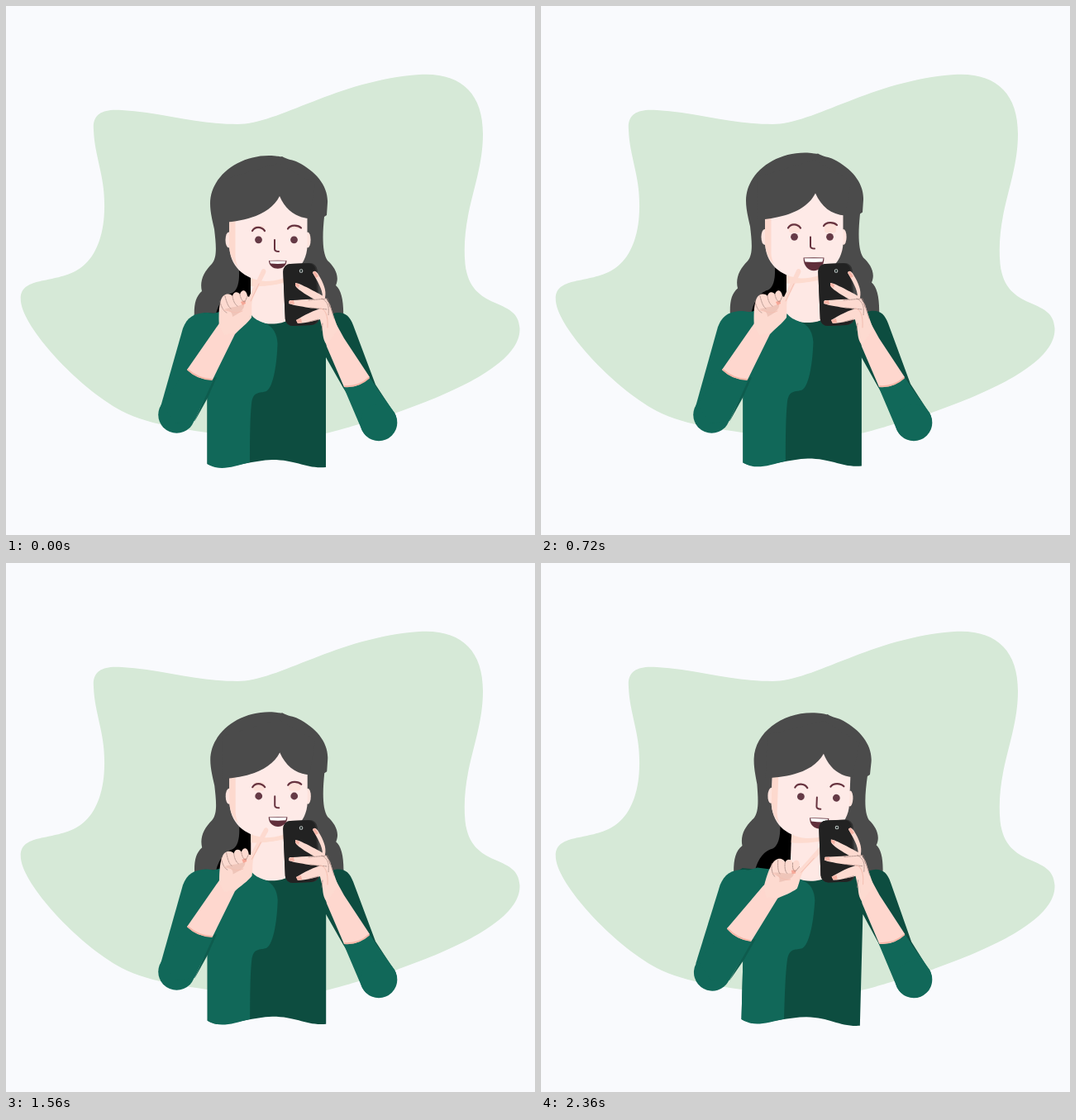
An HTML page for the animation above (2.4 s loop, 640 by 640 pixels).

```html
<!DOCTYPE html>
<html lang="en">
<head>
<meta charset="utf-8">
<title>Selfie</title>
<style>
html, body { margin: 0; width: 100%; height: 100%; overflow: hidden; background: #f9fafd; }
svg { display: block; width: 100%; height: 100%; }
.line { fill: none; stroke-linecap: round; stroke-linejoin: round; }
</style>
</head>
<body>
<svg viewBox="0 0 640 640">
  <path fill="#d6e9d7" d="M106 150C104 130 118 124 140 126C190 129 230 143 280 143C330 143 400 90 500 83C550 80 577 105 577 155C577 210 550 250 555.500 312C562 372 620 350 621.500 390C623 430 550 465 470 493C430 505 405 513 387 517C340 522 290 522 243 516C200 510 165 503 140 490C85 460 22 390 18 358C14 325 60 338 90 317C109 304 120 275 119 238C119 205 107 180 106 150Z"/>

  <g id="head">
    <path fill="#4b4b4b" d="M228 380C227 362 229 352 237 345C234 333 239 322 249 312C256 304 254 288 252 270C249 257 247 248 247 239C247 207 280 181 318 181C330 181 331 183 334 182C340 186 348 186 353 189C375 200 390 218 389 238L388 253L385 255C383 275 382 298 389 308C398 316 404 327 399 338C406 344 409 358 408 380Z"/>
    <path fill="#000" d="M281 308L297 326V378H253C256 358 266 349 274 347C283 342 283 325 281 308Z"/>
    <path fill="#fee8e4" d="M296 322H346V392H296Z"/>
    <path fill="#fddbcf" d="M296 326H346V332C330 337 312 340 296 339Z"/>
    <ellipse cx="269.500" cy="283" rx="4" ry="9.500" fill="#fee3dd"/>
    <ellipse cx="365" cy="283" rx="3.600" ry="9.500" fill="#fee3dd"/>
    <path fill="#feeae7" d="M270 228H364.500V290C364 316 342 333 314 333C288 331 270 315 270 288Z"/>
    <path fill="#fdd9ce" d="M270 240H277.500V300C277 306 279 312 281 316C274 309 270 300 270 288Z"/>
    <path fill="#4b4b4b" d="M262 262C295 260 321 250 331 230C338 246 350 256 367 257L374 215L330 190L262 210Z"/>
    <g fill="#653a46">
      <circle cx="305.500" cy="282.800" r="4.400"/>
      <circle cx="348.500" cy="282.800" r="4.400"/>
    </g>
    <g fill="#fde0d8">
      <rect class="lid" x="299" y="266" width="13.500" rx="3"/>
      <rect class="lid" x="342" y="266" width="14" rx="3"/>
    </g>
    <g id="shut" fill="#fee4dd" stroke="#f3c6b8" stroke-width=".9">
      <circle cx="306" cy="283" r="4.300"/>
      <circle cx="349" cy="283" r="4.300"/>
    </g>
    <path class="line" stroke="#67333f" stroke-width="2.200" d="M298 272C301 266.500 309 266.500 313 272M341 269.500C344 264.500 353 264.500 357 268.500"/>
    <path class="line" stroke="#67333f" stroke-width="2" d="M325 283V294Q325 297 330 297"/>
    <path id="mouth" fill="#602f3b"/>
    <path id="teeth" fill="#fff"/>
  </g>

  <g id="sleeveR">
    <path fill="#0d4d40" d="M386 374L400 371C410 370 416 375 420 386L447 458L468 490L436 505L408 462L387 425Z"/>
  </g>

  <g id="torso">
    <path fill="#0d4d40" d="M297 375C304 387 332 387 343 379L398 373L402 390L387 424V558C362 560 352 549 322 549C292 550 262 564 243.500 554V450L225 380L240 371Z"/>
    <path fill="#116859" d="M258 370L297 374C301 379 306 381 311 383C324 387 328 398 328.500 408C328 430 324 461 315 466C307 469 299 465 297 481C295 500 295 530 295 552C273 558 258 563 243.500 554V450L225 380Z"/>
  </g>

  <g id="sleeveL">
    <path fill="#116859" d="M214 390C219 377 227 371 244 371L264 374L256 430L229 500L187 485Z"/>
  </g>

  <g id="armL">
    <circle cx="206.500" cy="494.500" r="22.300" fill="#116859"/>
    <path fill="#0e5c4e" d="M250 450L255 449L244 474L228 503Z"/>
    <path fill="#116859" d="M189 483L218 439L251 452L228 502L206 505Z"/>
    <path fill="#fed7ce" d="M219 440L258 384C265 375 292 378 286 388L277 397L250 452Q232 453 219 440Z"/>
    <path class="line" stroke="#f4b5a6" stroke-width="1.800" d="M220 440Q232 451 249 452"/>
    <g id="handL">
      <path fill="#fddad0" d="M258 387C257 371 258 353 264 350C268 347 273 349 274 351C275 345 281 345 283 349C285 342 291 343 292 351L294 352L309 320C311 316 316 319 314 323L299 353C296 360 298 368 297 377C292 384 284 390 278 395L264 398Z"/>
      <path fill="#efc5b9" d="M264 367C272 364 282 364 288 360C290 367 280 373 274 376C274 370 270 368 264 367Z"/>
      <path fill="#f6a797" d="M284 358L289 356L290 360L286 362Z"/>
      <path class="line" stroke="#9d817b" stroke-width=".7" stroke-dasharray="2 1" d="M259 357C260 364 264 370 267 371M265 351C267 359 269 364 272 366M274 351C275 358 278 362 280 363M283 349C284 354 286 358 289 358L292 351"/>
      <path class="line" stroke="#f4bfb1" stroke-width=".9" d="M296 357L306 336M264 368C271 368 278 374 286 369"/>
    </g>
  </g>

  <g id="armR">
    <path fill="#116859" d="M408 460L440 449L450 464L470 492A22.300 22.300 0 0 1 431 514Z"/>
    <circle cx="451" cy="504" r="22.300" fill="#116859"/>
    <path fill="#fed7ce" d="M385 398L398 382L409 402L440 449Q427 463 409 461L388 412Z"/>
    <path class="line" stroke="#f4b5a6" stroke-width="1.800" d="M410 460Q427 461 439 450"/>
    <g transform="rotate(-2.500 358 349)">
      <rect x="336.500" y="311.500" width="41.500" height="75" rx="9" fill="#303030"/>
      <rect x="336.500" y="311.500" width="39.500" height="75" rx="9" fill="#222"/>
      <circle cx="358.300" cy="320.500" r="2.300" fill="#cfd6d4"/>
      <circle cx="358.300" cy="320.500" r="1.400" fill="#25302e"/>
    </g>
    <g fill="#fddad0">
      <path d="M371 323C372 319 376 321 378 325C384 335 388 344 386 353L392 361L397 377L402 391L388 410C382 402 384 394 382 388L378 371L383 352C383 343 377 333 371 323Z"/>
      <path d="M350 335C353 334 375 346 386 352L385 362C372 354 352 344 350 338Z"/>
      <path d="M343 356C354 356 371 354 388 354L390 368C374 366 349 363 342 360Z"/>
      <path d="M351 380C360 375 372 367 387 365L390 376C378 380 362 384 353 384Z"/>
    </g>
    <g fill="#f6b3a5">
      <path d="M371 322L374 321L378 327L375 329Z"/>
      <path d="M350 335L355 337L354 341L350 338Z"/>
      <path d="M342 357L348 356L349 361L343 360Z"/>
      <path d="M351 380L357 378L358 383L353 384Z"/>
    </g>
    <path class="line" stroke="#9d817b" stroke-width=".7" stroke-dasharray="2 1" d="M366 356L389 354L392 364M368 365L388 367M367 382L378 379M382 354C390 358 391 364 390 374M383 384L382 393M391 360L397 378"/>
    <path class="line" stroke="#f4bfb1" stroke-width="1" d="M380 366C386 366 390 374 389 389"/>
  </g>
</svg>
<script>
const LOOP = 2400, STEP = 40;
const el = id => document.getElementById(id);
const lids = document.querySelectorAll('.lid');

// Eased value through time/value pairs.
function track(t, keys) {
  if (t <= keys[0][0]) return keys[0][1];
  for (let i = 1; i < keys.length; i++) {
    const [a, from] = keys[i - 1], [b, to] = keys[i];
    if (t <= b) {
      const p = (t - a) / (b - a);
      return from + (to - from) * p * p * (3 - 2 * p);
    }
  }
  return keys[keys.length - 1][1];
}

const breath = [[0, 0], [520, .98], [860, 1], [1200, 1], [1720, 0]];
const sway = [[1700, 0], [2390, 1]];
const elbow = [[1820, 0], [2370, 5.5]];
const wrist = [[1240, 0], [1560, 2.5], [1880, 8], [2360, 11.3]];
const phone = [[1560, 0], [1880, .3]];
const lid = [[0, .15], [400, .35], [720, .57], [960, 1], [1300, 1], [1500, .5], [1900, .4], [2340, 0]];
const talk = [[0, 0], [380, .04], [720, 1], [1300, 1], [1600, .3], [1880, .1], [2360, .5]];

const move = (id, value) => el(id).setAttribute('transform', value);
const turn = (a, x, y) => `rotate(${a} ${x} ${y})`;
const sleeve = (a, x, y, lift) =>
  `${turn(a, x, y)} translate(0 ${y}) scale(1 ${1 + lift / 122}) translate(0 ${-y})`;

function drawMouth(open) {
  const l = 318 - open * 1.5, r = 339.5 + open * 2, depth = 13 + open * 8;
  const top = 308;
  el('mouth').setAttribute('d',
    `M${l} ${top}Q${(l + r) / 2} ${top - .6} ${r} ${top}C${r} ${top + depth} ${l} ${top + depth} ${l} ${top}Z`);
  const drop = 3.6 + open * 1.4;
  el('teeth').setAttribute('d',
    `M${l + 1} ${top + .6}H${r - 1}L${r - 2} ${top + drop}Q${(l + r) / 2} ${top + drop + .8} ${l + 2} ${top + drop}Z`);
}

function draw(t) {
  const b = track(t, breath), s = track(t, sway), shut = track(t, lid);
  move('head', `translate(${b} ${-3.5 * b}) ${turn(2.25 * s, 316, 510)}`);
  move('torso', `translate(${.9 * b} ${-1.6 * b}) ${turn(1.5 * s, 316, 515)}`);
  move('sleeveL', sleeve(1.5 * s, 207, 495, 2 * b + s));
  move('sleeveR', sleeve(1.4 * s, 451, 505, 2 * b - s));
  move('armL', `translate(${.7 * s} ${.7 * s}) ${turn(track(t, elbow), 205, 495)}`);
  move('handL', turn(track(t, wrist), 265, 390));
  move('armR', turn(track(t, phone), 451, 504));
  lids.forEach(n => n.setAttribute('height', 21 * shut));
  el('shut').setAttribute('opacity', shut > .92 ? 1 : 0);
  drawMouth(track(t, talk));
}

const start = performance.now();
function tick(now) {
  const t = Math.max(0, now - start) % LOOP;
  draw(Math.floor(t / STEP) * STEP);
  requestAnimationFrame(tick);
}
draw(0);
requestAnimationFrame(tick);
</script>
</body>
</html>
```
